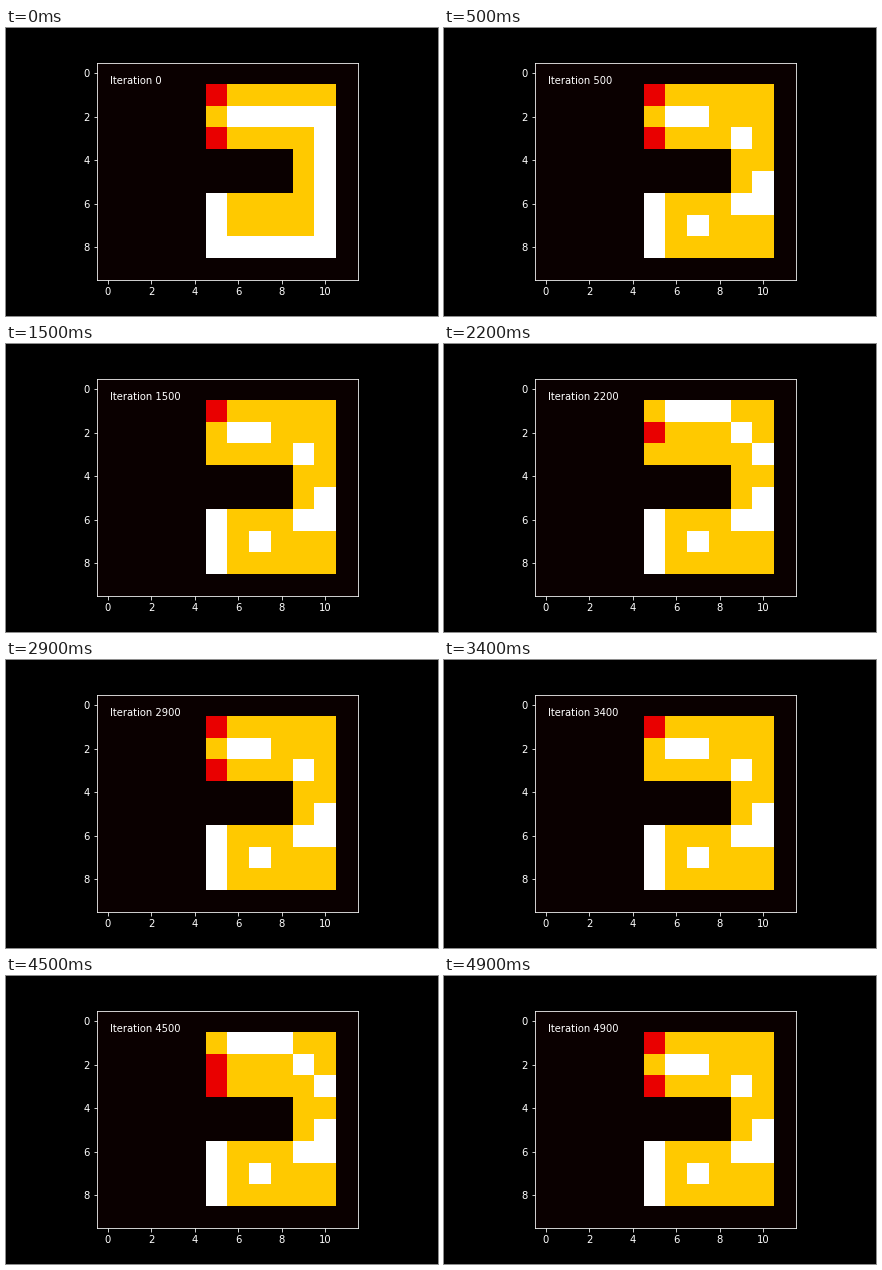
Animation, 432 px wide and 288 px high, one loop 5000 ms. Source, as a matplotlib script:

```python
import numpy as np
import matplotlib.pyplot as plt
from matplotlib.animation import FuncAnimation

FRAMES, INTERVAL = 50, 100
FINISH, ROAD = 1, 2  # a driven cell is raised by one

plt.style.use("dark_background")
plt.rcParams.update({"font.family": "DejaVu Sans", "font.size": 10, "toolbar": "None"})

# Cells are (row, column).
LOWER_PATH = [(5, 10), (6, 10), (6, 9), (7, 7), (6, 5), (7, 5), (8, 5)]
MIDDLE_EXIT = [(2, 5), (2, 6), (2, 7), (3, 9)]
TOP_EXIT = [(1, 5), (1, 6), (1, 7), (1, 8), (2, 9), (3, 10)]
FIRST_LAP = ([(2, c) for c in range(5, 11)] + [(r, 10) for r in range(3, 9)]
             + [(8, c) for c in range(5, 10)] + [(6, 5), (7, 5)])
TOP_EXIT_FRAMES = {10, 17, 22, 27, 32, 40, 45, 48}


def make_track():
    track = np.zeros((10, 12))
    track[1:4, 5:11] = ROAD
    track[4:6, 9:11] = ROAD
    track[6:9, 5:11] = ROAD
    track[1:4, 5] = FINISH
    return track


def driven_cells(frame):
    if frame == 0:
        return FIRST_LAP
    upper = TOP_EXIT if frame in TOP_EXIT_FRAMES else MIDDLE_EXIT
    overshoot = [(3, 5)] if 12 <= frame <= 24 or 31 <= frame <= 43 else []
    return LOWER_PATH + upper + overshoot


def grid_at(frame):
    grid = make_track()
    for cell in driven_cells(frame):
        grid[cell] += 1
    return grid


fig = plt.figure(figsize=(6, 4), dpi=72, facecolor="black")
ax = fig.add_subplot()
fig.subplots_adjust(left=0.125, right=0.9, bottom=0.125, top=0.88)
image = ax.imshow(grid_at(0), cmap="hot", vmin=0, vmax=3, interpolation="nearest")
ax.set_xticks(range(0, 11, 2))
ax.set_yticks(range(0, 9, 2))
label = ax.text(0.1, 0.5, "Iteration 0", color="white")


def update(frame):
    image.set_data(grid_at(frame))
    label.set_text(f"Iteration {frame * 100}")
    return image, label


animation = FuncAnimation(fig, update, frames=FRAMES, interval=INTERVAL,
                          repeat=True, repeat_delay=0)
plt.show()
```
